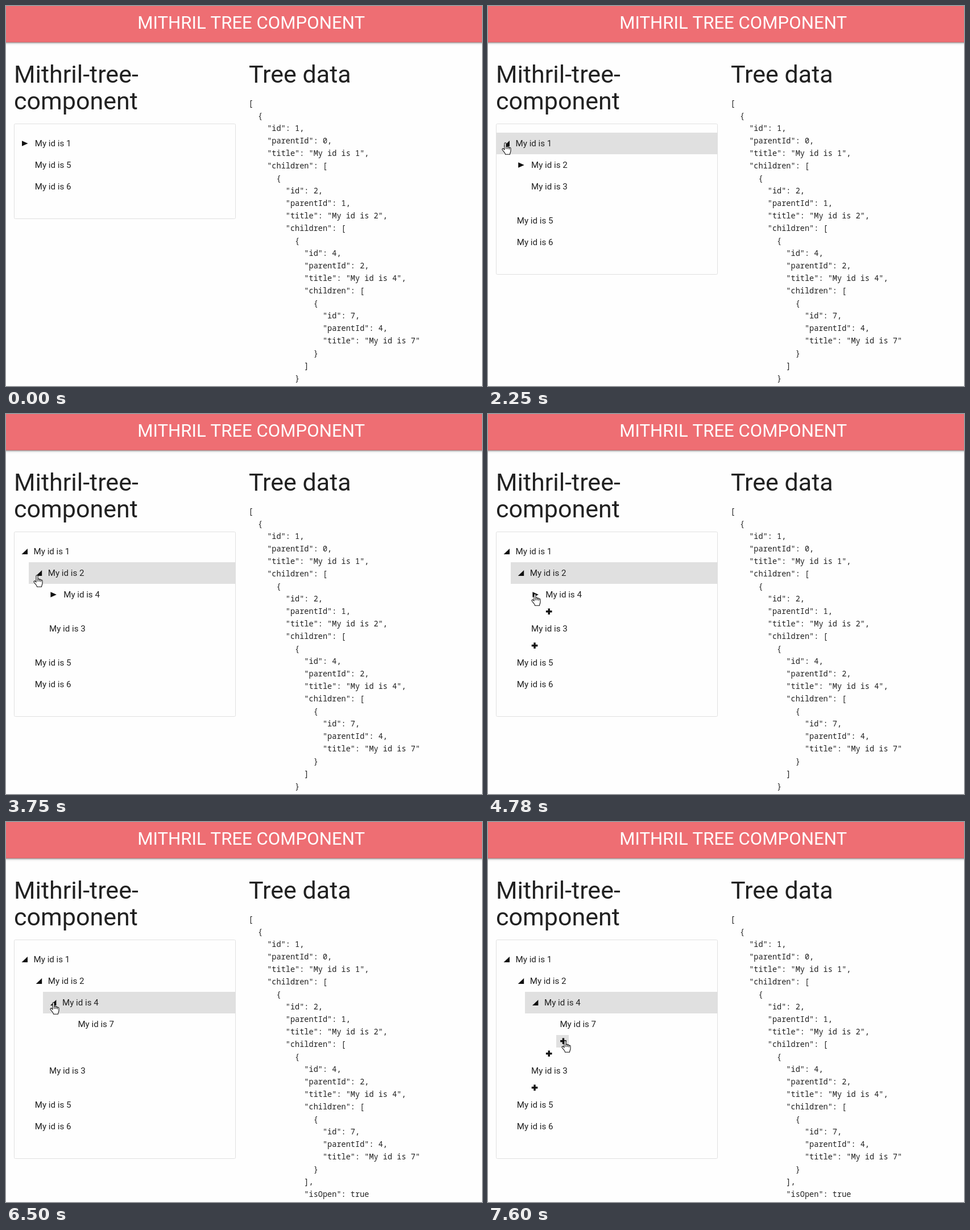
Animation of 837x669 px, one loop 8 s. Source, as an HTML page with a canvas:

```html
<!DOCTYPE html>
<html lang="en">
<head>
<meta charset="utf-8">
<title>Mithril tree component</title>
<style>
  html, body { margin: 0; width: 100%; height: 100%; overflow: hidden; background: #fefefe; }
  canvas { display: block; }
</style>
</head>
<body>
<canvas id="stage" width="837" height="669"></canvas>
<script>
const ctx = document.getElementById('stage').getContext('2d');
const LOOP = 8000;
const INK = '#212121', GREY = '#e0e0e0', PAPER = '#fefefe';
const SANS = 'Roboto, sans-serif', MONO = '"Noto Sans Mono", monospace';
const ROW = 38, PLUS_ROW = 22, INDENT = 25.2;
const BOX = { left: 14, right: 404, top: 207, padding: 16 };

// When each node is opened; it stays highlighted until the next one.
const opened = { 1: 2250, 2: 3750, 4: 5180 };
// Spans in which the add buttons show.
const plusSpans = [[2770, 3750], [4280, 5180], [6570, LOOP]];

// Pointer moves: start, end, number of steps, way points.
const moves = [
  [360, 500, 3, [[712, 641], [413, 411]]],
  [810, 1550, 11, [[413, 411], [250, 300], [80, 204], [22, 222], [30, 241]]],
  [2700, 3310, 9, [[30, 241], [54, 284]]],
  [4210, 4780, 9, [[54, 284], [82, 317]]],
  [6500, 7300, 12, [[82, 317], [120, 350], [134, 380]]],
  [7380, 7600, 4, [[134, 380], [135, 385]]],
];
const handSpots = moves.slice(1).map(([, , , points]) => points[points.length - 1]);

function node(id, parentId, children) {
  return { id, parentId, title: `My id is ${id}`, ...(children && { children }) };
}

function buildTree(t) {
  const tree = [
    node(1, 0, [node(2, 1, [node(4, 2, [node(7, 4)])]), node(3, 1)]),
    node(5, 0),
    node(6, 0),
  ];
  const open = list => list.forEach(n => {
    if (t >= opened[n.id]) n.isOpen = true;
    if (n.children) open(n.children);
  });
  open(tree);
  return tree;
}

function pointerAt(t) {
  const move = moves.filter(m => t >= m[0]).pop();
  if (!move) return null;
  const [start, end, steps, points] = move;
  const step = Math.floor((t - start) / (end - start) * (steps - 1) + 1e-6) + 1;
  const p = Math.min(step / steps, 1);
  const along = p * p * (3 - 2 * p) * (points.length - 1);
  const i = Math.min(Math.floor(along), points.length - 2);
  const mix = axis => points[i][axis] + (points[i + 1][axis] - points[i][axis]) * (along - i);
  return { x: Math.round(mix(0)), y: Math.round(mix(1)) };
}

function text(str, x, y, size, family = SANS, color = INK) {
  ctx.font = `${size}px ${family}`;
  ctx.fillStyle = color;
  ctx.fillText(str, x, y);
}

function rect(x, y, w, h, color) {
  ctx.fillStyle = color;
  ctx.fillRect(x, y, w, h);
}

function triangle(points) {
  ctx.fillStyle = '#111';
  ctx.beginPath();
  points.forEach(([x, y]) => ctx.lineTo(x, y));
  ctx.fill();
}

function drawHeader() {
  ctx.save();
  for (const [dy, blur, alpha] of [[2, 2, 0.14], [1, 1, 0.12], [1, 5, 0.2]]) {
    ctx.shadowOffsetY = dy;
    ctx.shadowBlur = blur;
    ctx.shadowColor = `rgba(0,0,0,${alpha})`;
    rect(-10, -10, 857, 73.5, '#ee6e73');
  }
  ctx.restore();
  text('MITHRIL TREE COMPONENT', 231.2, 40, 31.2, SANS, '#fff');
  text('Mithril-tree-', 14, 135, 43);
  text('component', 14, 182, 43);
  text('Tree data', 427, 135, 43);
}

function drawJson(tree) {
  JSON.stringify(tree, null, 2).split('\n').slice(0, 23)
    .forEach((line, i) => text(line, 426.6, 176 + 22 * i, 13.58, MONO));
}

function drawRow(n, depth, y, scene) {
  const shift = depth * INDENT, mid = y + ROW / 2;
  if (n.id === scene.selected) {
    const left = Math.round(BOX.left + 1 + shift);
    rect(left, y, BOX.right - 1 - left, ROW, GREY);
  }
  if (n.isOpen) {
    triangle([[27.5 + shift, mid + 5], [38 + shift, mid - 5], [38 + shift, mid + 5]]);
  } else if (n.children) {
    triangle([[28 + shift, mid - 4.8], [38.5 + shift, mid], [28 + shift, mid + 4.8]]);
  }
  text(n.title, (n.isOpen ? 48.6 : 50.8) + shift, mid + 5, 15.1);
  if (n.id === 7 && scene.deletable) drawCross(393.5, mid);
}

function drawCross(x, y) {
  ctx.strokeStyle = '#111';
  ctx.lineWidth = 2.6;
  ctx.beginPath();
  ctx.moveTo(x - 4, y - 4);
  ctx.lineTo(x + 4, y + 4);
  ctx.moveTo(x + 4, y - 4);
  ctx.lineTo(x - 4, y + 4);
  ctx.stroke();
}

function drawPlus(depth, y, hovered) {
  const x = 56.8 + depth * INDENT, mid = y + PLUS_ROW / 2 - 0.3;
  if (hovered) rect(Math.round(x - 12), y, 22, PLUS_ROW, GREY);
  rect(x - 5.3, mid - 1.7, 10.6, 3.4, '#111');
  rect(x - 1.7, mid - 5.3, 3.4, 10.6, '#111');
}

// Draws one level of the tree and returns the y below it.
function drawLevel(list, depth, y, scene) {
  for (const n of list) {
    drawRow(n, depth, y, scene);
    y += ROW;
    if (n.isOpen) y = drawLevel(n.children, depth + 1, y, scene);
  }
  if (depth && scene.plusShown) drawPlus(depth, y, depth === 3 && scene.plusHovered);
  return y + PLUS_ROW;
}

function drawBox(tree, scene) {
  const { left, right, top, padding } = BOX;
  const bottom = drawLevel(tree, 0, top + padding, scene) + padding;
  ctx.strokeStyle = GREY;
  ctx.lineWidth = 1;
  ctx.beginPath();
  ctx.roundRect(left + 0.5, top + 0.5, right - left - 1, bottom - top - 1, 2);
  ctx.stroke();
}

const arrowShape = new Path2D('M.5 .5V15.5L4 12.2L6.4 17.5L8.7 16.5L6.4 11.4H11Z');
const handShape = new Path2D(
  'M5 13V2.2C5 .2 8 .2 8 2.2V8C8.4 6.8 10.8 7 10.8 8.6C11.4 7.6 13.4 8 13.4 9.6' +
  'C14.2 8.8 16 9.2 16 11V15C16 17.5 14.5 18.5 14.5 21.3H6.5C6.5 19 3.8 16.8 1.2 13.2' +
  'C.2 11.4 2.4 10.2 3.6 11.6Z');
const knuckles = new Path2D('M8 8V12M10.8 8.6V12M13.4 9.6V12.5');

function drawPointer({ x, y }) {
  const hand = handSpots.some(([hx, hy]) => Math.hypot(x - hx, y - hy) < 9);
  ctx.save();
  ctx.translate(hand ? x - 6 : x, hand ? y - 1 : y);
  ctx.lineWidth = 1.1;
  ctx.lineJoin = 'round';
  ctx.fillStyle = '#fff';
  ctx.strokeStyle = '#111';
  ctx.fill(hand ? handShape : arrowShape);
  ctx.stroke(hand ? handShape : arrowShape);
  if (hand) ctx.stroke(knuckles);
  ctx.restore();
}

function draw(t) {
  const tree = buildTree(t), pointer = pointerAt(t);
  const scene = {
    selected: [1, 2, 4].filter(id => t >= opened[id]).pop(),
    plusShown: plusSpans.some(([from, to]) => t >= from && t < to),
    plusHovered: t > 6500 && pointer.y > 375,
    deletable: t > 6500 && t < 7380 && pointer.y > 337,
  };
  rect(0, 0, 837, 669, PAPER);
  drawHeader();
  drawJson(tree);
  drawBox(tree, scene);
  if (pointer) drawPointer(pointer);
}

const began = performance.now();
function tick() {
  draw((performance.now() - began) % LOOP);
  requestAnimationFrame(tick);
}
tick();
</script>
</body>
</html>
```
